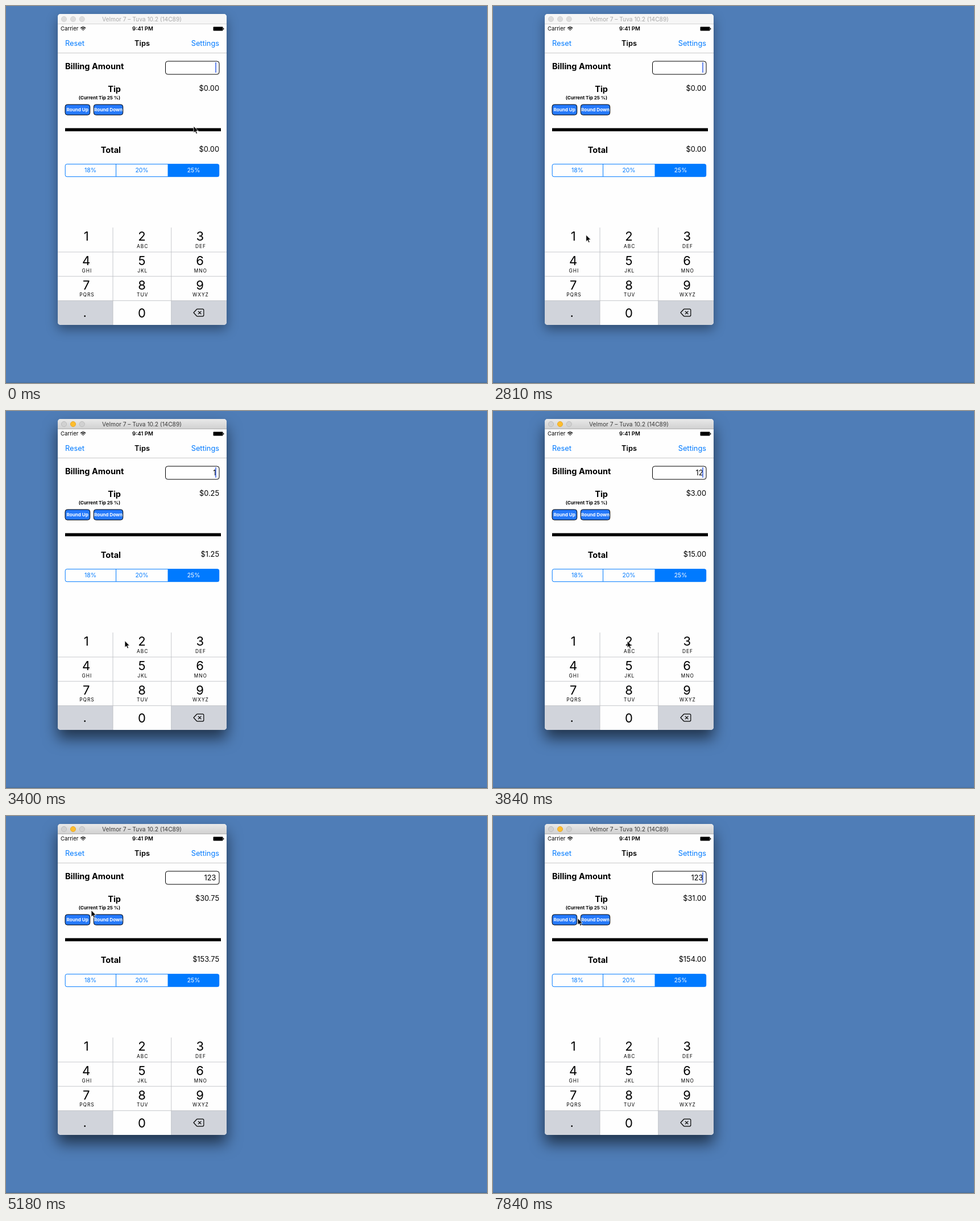
An HTML page that plays this animation: 846x662 px, repeating every 7.99 s.

```html
<!DOCTYPE html>
<html lang="en">
<head>
<meta charset="utf-8">
<title>Tip calculator</title>
<style>
  html, body { margin: 0; width: 100%; height: 100%; overflow: hidden; background: #4f7db7; }
  #shadow { position: absolute; left: 91px; top: 14px; width: 297px; height: 546px; border-radius: 5px;
    box-shadow: 0 8px 20px rgba(0,0,0,.38); }
  #shadow.active { box-shadow: 0 15px 26px rgba(0,0,0,.58); }
  svg { position: absolute; left: 0; top: 0; display: block; }
  text { font: 12.8px Inter, "Open Sans", sans-serif; }
  .bold { font-weight: 700; font-size: 14.5px; }
  .mid { text-anchor: middle; }
  .end { text-anchor: end; }
  .blue { fill: #007aff; }
  .small { font-size: 9.6px; }
  .tiny { font-weight: 700; font-size: 8.1px; }
  .segment { font-size: 10.4px; text-anchor: middle; fill: #007aff; }
  .digit { font-size: 22px; text-anchor: middle; }
  .letters { font-size: 8.3px; letter-spacing: 1px; text-anchor: middle; }
  .button { fill: #2579fb; stroke: #000; }
  #title { font-size: 10.2px; fill: #a9a9a9; }
  #bar { fill: #f6f6f6; }
  .light { fill: #dcdcdc; stroke: #cecece; stroke-width: .8; }
  .active #title { fill: #3b3b3b; }
  .active #bar { fill: url(#metal); }
  .active #barLine { fill: #b0b0b0; }
  .active .light { fill: #d1d1d1; stroke: #b5b5b5; }
  .active .minimize { fill: #ffbd2e; stroke: #dfa023; }
</style>
</head>
<body>
<div id="shadow"></div>
<svg id="stage" width="846" height="662" viewBox="0 0 846 662">
  <defs>
    <clipPath id="frame"><rect x="91" y="14" width="297" height="546" rx="5"/></clipPath>
    <linearGradient id="metal" x2="0" y2="1">
      <stop stop-color="#e9e9e9"/><stop offset="1" stop-color="#d0d0d0"/>
    </linearGradient>
  </defs>
  <rect y="660.5" width="846" height="1.5" fill="#48719f"/>

  <g clip-path="url(#frame)">
    <rect x="91" y="14" width="297" height="546" fill="#fefefe"/>
    <rect id="bar" x="91" y="14" width="297" height="17.5"/>
    <rect id="barLine" x="91" y="31" width="297" height="1" fill="#d4d4d4"/>
    <circle class="light" cx="102" cy="23" r="4.6"/>
    <circle class="light minimize" cx="118" cy="23" r="4.6"/>
    <circle class="light" cx="133.7" cy="23" r="4.6"/>
    <text id="title" class="mid" x="239" y="27">Velmor 7 – Tuva 10.2 (14C89)</text>
    <rect x="91" y="82" width="297" height="1" fill="#c9c9c9"/>
    <g id="keypad"></g>
  </g>

  <text class="small" x="96" y="43.4">Carrier</text>
  <g fill="none" stroke="#000" stroke-width="1.4">
    <path d="M131.2 39q4.4-4 8.8 0M133 41q2.6-2.3 5.2 0"/>
    <path d="M134.3 42.1h2.6l-1.3 1.4z" fill="#000" stroke="none"/>
  </g>
  <text class="small mid" x="240.5" y="43.4" style="font-weight:600">9:41 PM</text>
  <rect x="364.5" y="36.5" width="17" height="7" rx="1"/>
  <rect x="382" y="38.5" width="1.3" height="3" rx=".6"/>

  <text class="blue" x="104" y="70">Reset</text>
  <text class="mid" x="239.5" y="70" style="font-weight:600">Tips</text>
  <text class="blue end" x="375" y="70">Settings</text>

  <text class="bold" x="104" y="111">Billing Amount</text>
  <rect x="280.5" y="97" width="94.5" height="23" rx="4" fill="#fff" stroke="#000"/>
  <text id="bill" class="end" x="369.5" y="113"></text>
  <rect id="caret" x="368.2" y="99" width="1.6" height="18" fill="#4169e8"/>

  <text class="bold end" x="202" y="151">Tip</text>
  <text id="tip" class="end" x="375" y="149"></text>
  <text class="tiny end" x="201" y="163.5">(Current Tip 25 %)</text>
  <rect class="button" x="104" y="173" width="43.7" height="18.3" rx="4"/>
  <rect class="button" x="154.3" y="173" width="51.4" height="18.3" rx="4"/>
  <text class="tiny mid" x="125.7" y="185" fill="#fff">Round Up</text>
  <text class="tiny mid" x="180" y="185" fill="#fff">Round Down</text>

  <rect x="104" y="214.5" width="274" height="5.5"/>
  <text class="bold end" x="202" y="258">Total</text>
  <text id="total" class="end" x="375" y="256"></text>

  <rect x="104.2" y="277.7" width="270.5" height="22" rx="3" fill="none" stroke="#007aff"/>
  <path d="M284.5 277.5h87.5q3 0 3 3v16.5q0 3-3 3h-87.5z" fill="#007aff"/>
  <path d="M193.5 277.5v22" stroke="#007aff"/>
  <text class="segment" x="148.5" y="292.4">18%</text>
  <text class="segment" x="239" y="292.4">20%</text>
  <text class="segment" x="330" y="292.4" style="fill:#fff">25%</text>

  <path id="cursor" d="M0 0v11.8l2.7-2.5 1.8 4.2 2-.9-1.8-4.1h3.7z" stroke="#fff" stroke-width=".8"/>
</svg>
<script>
const LOOP = 7990, STEPS = 54, STEP = LOOP / STEPS;
const BLINK = 1040;
const $ = id => document.getElementById(id);

// Keypad: column edges, row edges and label centres
const colX = [91, 188, 290.7, 388], rowY = [389, 432, 474.7, 517.4, 560], midX = [141.2, 239, 341.2];
const letters = ['', 'ABC', 'DEF', 'GHI', 'JKL', 'MNO', 'PQRS', 'TUV', 'WXYZ'];
const KEY = '#fefefe', KEY_DOWN = '#d1d4db';

function buildKeypad() {
  let svg = '';
  for (let i = 0; i < 12; i++) {
    const c = i % 3, r = Math.floor(i / 3), x = colX[c], y = rowY[r];
    svg += `<rect id="key${i + 1}" x="${x}" y="${y}" width="${colX[c + 1] - x}" height="${rowY[r + 1] - y}"
      fill="${i === 9 || i === 11 ? KEY_DOWN : KEY}"/>`;
    if (i < 9) svg += `<text class="digit" x="${midX[c]}" y="${y + 23.3}">${i + 1}</text>
      <text class="letters" x="${midX[c] + 1.2}" y="${y + 35.5}">${letters[i]}</text>`;
  }
  svg += `<text class="digit" x="138.7" y="545.5">.</text><text class="digit" x="239" y="546.6">0</text>
    <path d="M188 389V560M290.7 389V560M91 432H388M91 474.7H388M91 517.4H388" stroke="#b9bbc0" stroke-width=".8"/>
    <path d="M330 538.5l5-5.5q.7-.8 1.8-.8h9q2 0 2 2v8.600q0 2-2 2h-9q-1.100 0-1.800-.8z
      M338 535.800l5.400 5.400m0-5.400l-5.400 5.400" fill="none" stroke="#000" stroke-width="1.2"/>`;
  $('keypad').innerHTML = svg;
}

// Each list pairs a step with the value that holds from it on
const bills = [[0, ''], [21, '1'], [25, '12'], [30, '123']];
const presses = [[0, 0], [20, 1], [21, 0], [24, 2], [25, 0], [28, 3], [30, 0]];
const rounding = [[0, v => v], [43, Math.floor], [50, Math.ceil]];
const ACTIVATE = 20;

// Pointer stops: step, x, y
const pointer = [
  [0, 330, 211], [5, 273, 209], [10, 273, 209], [18, 168, 401], [19, 163.7, 402], [21, 163.7, 402],
  [23, 209, 403.5], [25, 209, 403.5], [28, 314, 405], [30, 314, 405], [33, 44, 172], [35, 150, 165.5],
  [37, 114, 181], [38, 131, 181], [39, 131, 181], [41, 164, 182.5], [46, 164, 182.5],
  [49, 107, 181], [50, 107, 181], [51, 131, 180], [52, 131, 180], [53, 149, 179.5]
];

const valueAt = (list, step) => list.filter(e => e[0] <= step).pop()[1];
const money = v => '$' + v.toFixed(2);

function pointerAt(step) {
  const i = pointer.findIndex(p => p[0] >= step);
  const b = pointer[i], a = pointer[Math.max(0, i - 1)];
  const u = b[0] > a[0] ? (step - a[0]) / (b[0] - a[0]) : 1;
  const k = u * u * (3 - 2 * u);
  return [a[1] + (b[1] - a[1]) * k, a[2] + (b[2] - a[2]) * k];
}

// The caret stays lit while typing and otherwise fades out and in again
function caretAt(ms) {
  if (ms > 2900 && ms < 5000) return 1;
  const p = (ms - (ms < 2900 ? 110 : 850) + BLINK) % BLINK;
  return p < 150 ? 1 - p / 150 : p < 350 ? 0 : Math.min(1, (p - 350) / 90);
}

function draw(now) {
  const step = Math.floor((now % LOOP) / STEP + .05) % STEPS;
  const bill = valueAt(bills, step), amount = Number(bill);
  const tip = valueAt(rounding, step)(amount * .25);
  const active = step >= ACTIVATE, pressed = valueAt(presses, step);

  $('bill').textContent = bill;
  $('tip').textContent = money(tip);
  $('total').textContent = money(amount + tip);
  $('caret').setAttribute('opacity', caretAt(step * STEP));
  $('cursor').setAttribute('transform', `translate(${pointerAt(step)})`);
  $('stage').classList.toggle('active', active);
  $('shadow').classList.toggle('active', active);
  for (let n = 1; n <= 3; n++) $('key' + n).setAttribute('fill', n === pressed ? KEY_DOWN : KEY);
  requestAnimationFrame(draw);
}

buildKeypad();
draw(0);
</script>
</body>
</html>
```
